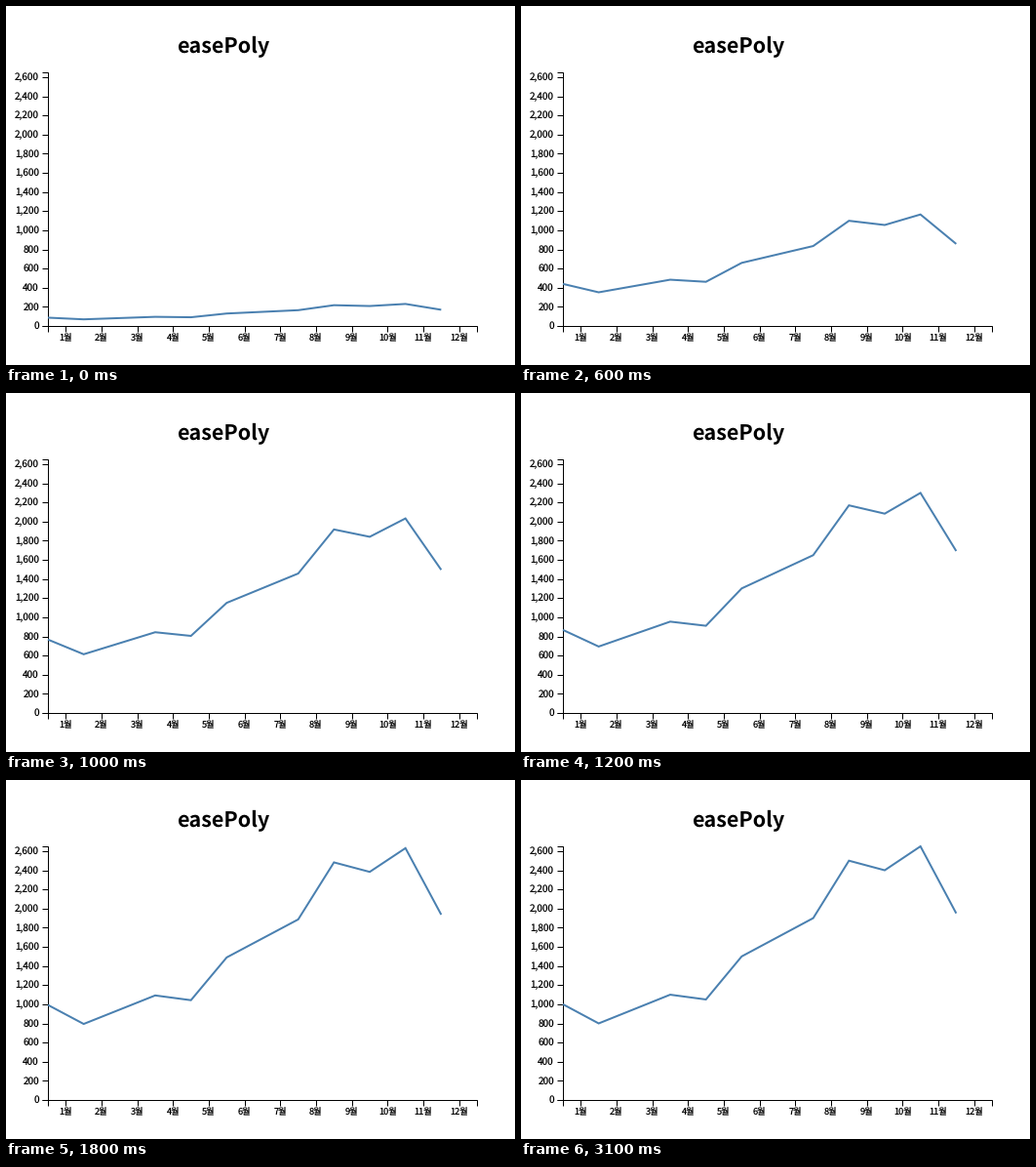
Animation of 522 by 368 pixels, one loop 5000 ms. Source, as a matplotlib script:

```python
import matplotlib.pyplot as plt
from matplotlib.animation import FuncAnimation
from matplotlib.patches import Polygon

WIDTH, HEIGHT, DPI = 522, 368, 64
PX = 72 / DPI  # points per pixel
LEFT, TOP, PLOT_W, PLOT_H = 43, 68, 440, 260
BASE = TOP + PLOT_H
SALES = [1000, 800, 950, 1100, 1050, 1500, 1700, 1900, 2500, 2400, 2650, 1950]
BAND = PLOT_W / len(SALES)
FRAMES, INTERVAL = 50, 100
EASE_START, EASE_MS = 0.279, 3000
POINTER_FRAME = 30

plt.rcParams["font.family"] = ["Noto Sans CJK JP", "DejaVu Sans"]
plt.rcParams["text.hinting"] = "none"

fig = plt.figure(figsize=(WIDTH / DPI, HEIGHT / DPI), dpi=DPI, facecolor="white")
ax = fig.add_axes([0, 0, 1, 1])
ax.set_xlim(0, WIDTH)
ax.set_ylim(HEIGHT, 0)
ax.axis("off")


def scale_y(value):
    return BASE - PLOT_H * value / max(SALES)


def stroke(xs, ys):
    # Snapping moves whole coordinates to pixel centres.
    ax.plot(xs, ys, color="black", lw=PX, solid_capstyle="butt",
            solid_joinstyle="miter", snap=True)


def label(x, y, text, size, align="center", weight="normal"):
    ax.text(x, y, text, fontsize=size * PX, ha=align, va="baseline",
            color="black", weight=weight)


def draw_axes():
    right = LEFT + PLOT_W
    stroke([LEFT - 6, LEFT, LEFT, LEFT - 6], [TOP, TOP, BASE, BASE])
    stroke([LEFT, LEFT, right, right], [BASE + 6, BASE, BASE, BASE + 6])
    for value in range(0, 2601, 200):
        y = scale_y(value)
        stroke([LEFT - 6, LEFT], [y, y])
        label(LEFT - 9, y + 3.2, f"{value:,}", 10, "right")
    for month in range(12):
        x = LEFT + (month + 0.5) * BAND
        stroke([x, x], [BASE, BASE + 6])
        label(x, BASE + 15.6, f"{month + 1}월", 9.2)


def ease_cubic(t):
    t = min(max(t, 0), 1)
    return 4 * t ** 3 if t < 0.5 else 1 - 4 * (1 - t) ** 3


draw_axes()
label(223, 47, "easePoly", 21.5, weight="bold")
line, = ax.plot([], [], color="#4a80b0", lw=2 * PX, zorder=4,
                solid_capstyle="butt", solid_joinstyle="miter")
line.set_xdata([LEFT + i * BAND for i in range(len(SALES))])
pointer = ax.add_patch(Polygon([(374, 358), (374, 372), (388, 372)],
                               facecolor="black", edgecolor="none", visible=False))


def update(frame):
    grow = ease_cubic(EASE_START + frame * INTERVAL / EASE_MS)
    line.set_ydata([scale_y(value * grow) for value in SALES])
    pointer.set_visible(frame == POINTER_FRAME)
    return line, pointer


update(0)
anim = FuncAnimation(fig, update, frames=FRAMES, interval=INTERVAL,
                     repeat=True, repeat_delay=0, blit=False)
plt.show()
```
